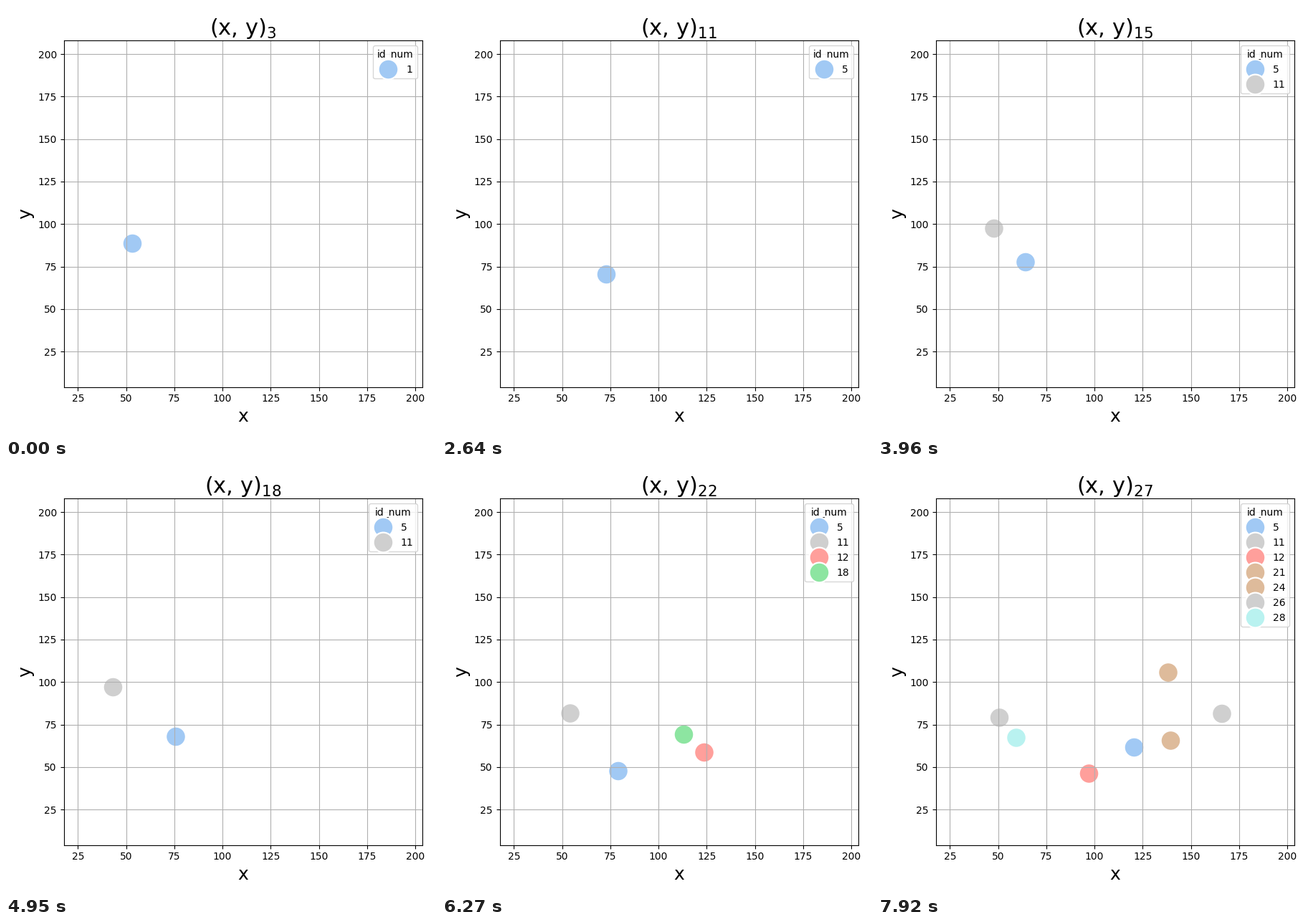
Animation, 600 px wide and 600 px high, one loop 8 s. Source, as a matplotlib script:

```python
import random
from itertools import count
import numpy as np
import matplotlib.pyplot as plt
from matplotlib.animation import FuncAnimation
from matplotlib.lines import Line2D

TICK = 40          # ms per drawn frame
HOLD = 330         # ms per data step
LOOP = 8000
STAGE = 600
SIZE = 400         # marker area in points squared
EDGE = 0.08 * SIZE ** 0.5

BLUE, ORANGE, GREEN, RED, PURPLE = "#a1c9f4", "#ffb482", "#8de5a1", "#ff9f9b", "#d0bbff"
BROWN, GRAY, CYAN = "#debb9b", "#cfcfcf", "#b9f2f0"


def to_data(px, py):
    """Stage pixels (y down) to axis units."""
    return 25 + (px - 100.3) / 2.691, 25 + (482.2 - py) / 2.372


def path(*keys, sag=0):
    """Positions per step between (step, x, y) keys, dipping by sag between them."""
    steps, xs, ys = zip(*keys)
    pos = {}
    for i in range(steps[0], steps[-1] + 1):
        phase = np.interp(i, steps, range(len(steps)))
        dip = sag * abs(np.sin(np.pi * phase))
        pos[i] = to_data(np.interp(i, steps, xs), np.interp(i, steps, ys) + dip)
    return pos


tracks = {
    1: (BLUE, path((0, 175.5, 331.5), (2, 174.5, 335))),
    5: (BLUE, path((2, 198, 386), (4, 206.5, 378.5), (8, 228.5, 373.5), (12, 206, 357.5),
                   (15, 237, 380.5), (19, 246, 428.5), (24, 357.5, 395.5), sag=22)),
    11: (GRAY, path((9, 207.5, 330), (12, 162, 310.5), (15, 149.5, 311.5),
                    (19, 179, 348), (24, 169.5, 354))),
    12: (RED, path((16, 398, 394), (19, 366, 402.5), (22, 318, 442), (24, 294.5, 432))),
    18: (GREEN, path((19, 337.5, 377.5))),
    21: (BROWN, path((21, 392, 306), (24, 405, 291))),
    24: (BROWN, path((22, 416, 380), (24, 408.5, 386))),
    26: (GRAY, path((24, 480, 348.5))),
    28: (CYAN, path((24, 193, 382))),
}

# Short-lived points that show for a single step, numbered with the free ids
rng = random.Random(4)
free = (i for i in count(2) if i not in tracks)
for step in (1, 3, 3, 7, 9, 11, 14, 17, 17, 18, 20, 21, 22):
    spot = (step, rng.uniform(240, 280 + 7 * step), rng.uniform(345, 390))
    tracks[next(free)] = (rng.choice([ORANGE, GREEN, PURPLE, CYAN]), path(spot))

fig, ax = plt.subplots(figsize=(6, 6), dpi=100)
ax.set_xlim(17.83, 203.63)
ax.set_ylim(4.0, 208.47)
ax.set_xticks(range(25, 201, 25))
ax.set_yticks(range(25, 201, 25))
ax.set_xlabel("x", fontsize=18)
ax.set_ylabel("y", fontsize=18)
ax.grid(True)
title = ax.set_title("(x, y)$_{3}$", fontsize=22)
dots = ax.scatter([], [], s=SIZE, edgecolors="white", linewidths=EDGE)
fig.tight_layout()

# Limits that keep the grid on the same pixels whatever the margins
box = ax.bbox
left, bottom = to_data(box.x0, STAGE - box.y0)
right, top = to_data(box.x1, STAGE - box.y1)
ax.set_xlim(left, right)
ax.set_ylim(bottom, top)


def key(num, color):
    return Line2D([], [], linestyle="", marker="o", markersize=SIZE ** 0.5,
                  markerfacecolor=color, markeredgecolor="white",
                  markeredgewidth=EDGE, label=str(num))


def update(k):
    step = (k * TICK + TICK - 1) // HOLD
    live = [(num, color, pos[step])
            for num, (color, pos) in sorted(tracks.items()) if step in pos]
    dots.set_offsets([p for _, _, p in live])
    dots.set_facecolors([c for _, c, _ in live])
    title.set_text(f"(x, y)$_{{{step + 3}}}$")
    ax.legend(handles=[key(n, c) for n, c, _ in live],
              title="id_num", loc="upper right")
    return dots, title


anim = FuncAnimation(fig, update, frames=LOOP // TICK, interval=TICK,
                     init_func=lambda: update(0), repeat=True, repeat_delay=0)
plt.show()
```
